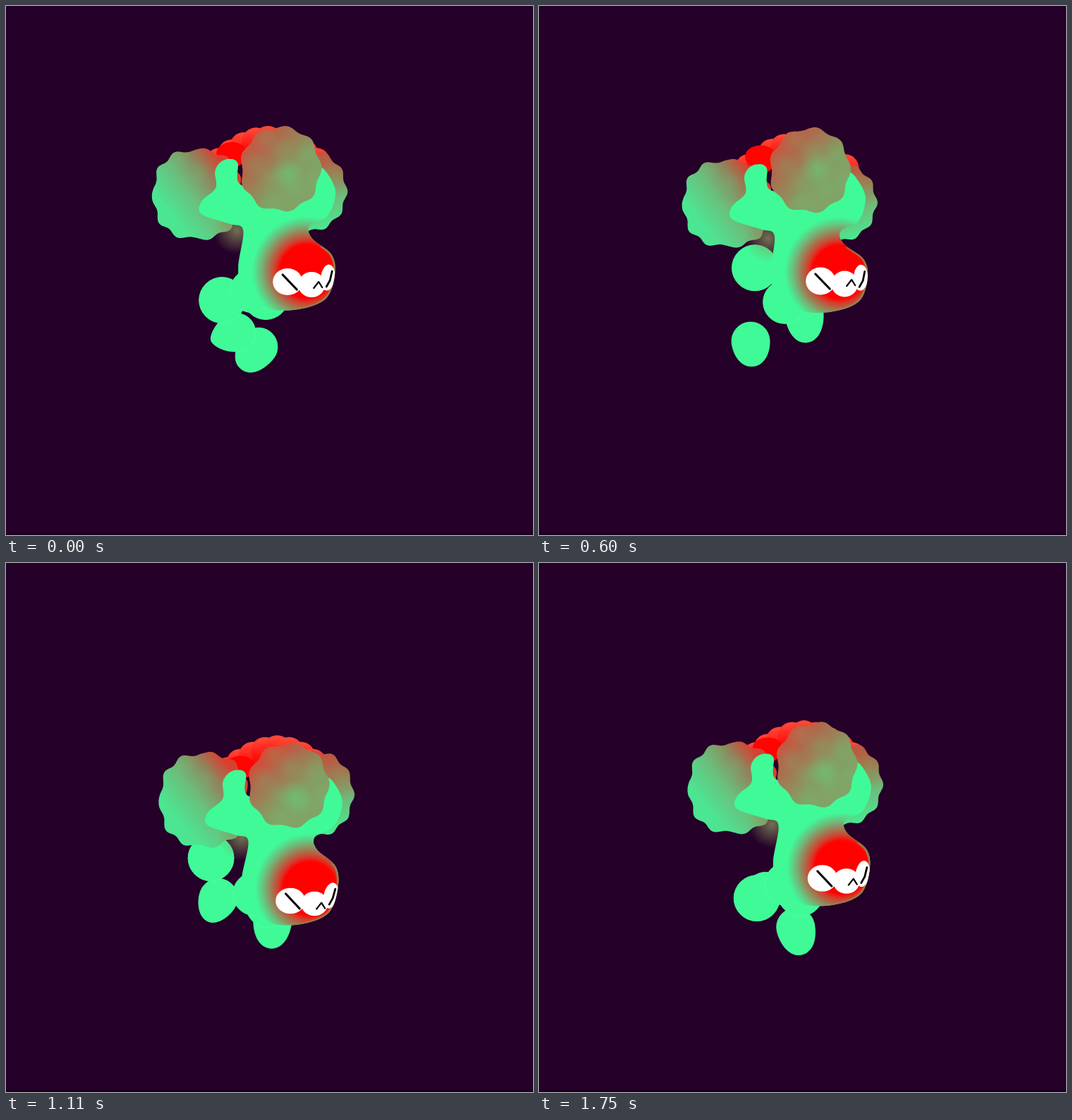
Write an HTML page with a canvas that moves like this. It is 747x750 px and loops after 1780 ms.

```html
<!DOCTYPE html>
<html lang="en">
<head>
<meta charset="utf-8">
<title>Running tree</title>
<style>
html, body { margin: 0; width: 100%; height: 100%; overflow: hidden; background: #250028; }
canvas { display: block; }
</style>
</head>
<body>
<canvas id="stage" width="747" height="750"></canvas>
<script>
const ctx = document.getElementById('stage').getContext('2d');
const LOOP = 1780, STEP = 455, BEAT = 30, TAU = Math.PI * 2;
const GREEN = '#40fa98', RIM = '#4bffa2';

// Bounce of the face: phase, height, lean
const bounce = [
  [20, 370, 0], [145, 389, -.28], [248, 556, 1], [300, 570, 1.1],
  [360, 492, .48], [385, 446, .08], [415, 390, 0]
];

// Trunk and head outline, measured from the face
const trunk = [
  [-96, -168], [-84, -173], [-71, -168], [-62, -135], [30, -150], [44, -162],
  [56, -153], [68, -126], [57, -93], [31, -78], [35, -60], [62, -38],
  [67, -10], [54, 25], [15, 40], [-30, 38], [-64, 12], [-70, -20],
  [-63, -72], [-82, -81], [-122, -95], [-122, -113], [-102, -132], [-103, -155]
];

const mix = (a, b, k) => a + (b - a) * k;
const clamp = (v, lo = 0, hi = 1) => Math.max(lo, Math.min(hi, v));
const wrap = (v, n) => ((v % n) + n) % n;
const bell = (v, mid, width) => Math.exp(-(((v - mid) / width) ** 2));

// Smooth periodic curve through the bounce keys, without overshoot
function pose(phase) {
  const n = bounce.length, key = i => bounce[wrap(i, n)];
  const gap = i => wrap(key(i + 1)[0] - key(i)[0], STEP);
  let i = 0;
  while (wrap(phase - key(i)[0], STEP) >= gap(i)) i++;
  const h = gap(i), s = wrap(phase - key(i)[0], STEP) / h;
  const [y, tilt] = [1, 2].map(c => {
    const slope = j => (key(j + 1)[c] - key(j)[c]) / gap(j);
    const tangent = j => {
      const a = slope(j - 1), b = slope(j);
      return a * b <= 0 ? 0 : 2 * a * b / (a + b);
    };
    return mix(key(i)[c], key(i + 1)[c], s * s * (3 - 2 * s)) +
      s * (1 - s) * h * ((1 - s) * tangent(i) - s * tangent(i + 1));
  });
  return { x: 398.3 + (y - 370) * .045, y, lean: tilt };
}

let face;

// Leaning shears the figure and lifts whatever lies farther back.
function place(x, y, depth = 0) {
  return [
    face.x + x + .12 * Math.max(0, -y) * face.lean,
    face.y + y - depth * face.lean
  ];
}

function smooth(pts) {
  const n = pts.length, at = i => pts[wrap(i, n)];
  const path = new Path2D();
  path.moveTo(...pts[0]);
  for (let i = 0; i < n; i++) {
    const [a, b, c, d] = [at(i - 1), at(i), at(i + 1), at(i + 2)];
    path.bezierCurveTo(
      b[0] + (c[0] - a[0]) / 6, b[1] + (c[1] - a[1]) / 6,
      c[0] - (d[0] - b[0]) / 6, c[1] - (d[1] - b[1]) / 6, c[0], c[1]);
  }
  path.closePath();
  return path;
}

function stops(g, colors) {
  for (const [at, color] of colors) g.addColorStop(at, color);
  return g;
}
const linear = (a, b, colors) => stops(ctx.createLinearGradient(...a, ...b), colors);
const radial = (p, r, colors) => stops(ctx.createRadialGradient(...p, 0, ...p, r), colors);

function inside(path, draw) {
  ctx.save();
  ctx.clip(path);
  draw();
  ctx.restore();
}

function glow([x, y], r, rgb, alpha) {
  ctx.fillStyle = radial([x, y], r, [[0, `rgba(${rgb},${alpha})`], [1, `rgba(${rgb},0)`]]);
  ctx.fillRect(x - r, y - r, r * 2, r * 2);
}

// A knobbly leaf ball: squareness below 1 fills out the corners.
function leaf([cx, cy], rx, ry, knobs, turn, square, from, to, colors) {
  const round = v => Math.sign(v) * Math.abs(v) ** square;
  const pts = [];
  for (let i = 0; i < knobs * 6; i++) {
    const a = i / (knobs * 6) * TAU;
    const r = 1 + .04 * Math.cos(knobs * (a - turn));
    pts.push([cx + rx * r * round(Math.cos(a)), cy + ry * r * round(Math.sin(a))]);
  }
  const path = smooth(pts);
  const at = ([u, v]) => [cx + u * rx, cy + v * ry];
  ctx.fillStyle = linear(at(from), at(to), colors);
  ctx.fill(path);
  inside(path, () => {
    for (let i = 1; i < 9; i++) {
      const a = i * 2.4, d = Math.sqrt(i / 9);
      glow(at([d * Math.cos(a), d * Math.sin(a)]), 20, '100,210,125', .16);
    }
  });
}

function ball([x, y], r) {
  ctx.beginPath();
  ctx.arc(x, y, r - .5, 0, TAU);
  ctx.fillStyle = GREEN;
  ctx.fill();
  ctx.strokeStyle = RIM;
  ctx.lineWidth = 1;
  ctx.stroke();
}

// Each foot swings forward for one step, then pushes back for the next.
function foot(phase) {
  const p = wrap(phase - 145, STEP * 2), s = (p % STEP) / STEP;
  const arch = Math.sin(Math.PI * s), swing = p < STEP;
  let x, y, deg, reach, toe;
  if (swing) {
    x = 300 + 76 * s * s;
    y = 475 - 35 * s * s;
    deg = 85 + 80 * arch;
    reach = 22 + 10 * arch;
    toe = 14 - 8 * arch;
  } else {
    x = 376 - 73 * s * s + 8 * arch;
    y = face.y + mix(51, 84, s) - 55 * bell(s, .24, .14) + 128 * bell(s, .725, .1);
    deg = 85 + 45 * arch * Math.cos(TAU * (s - .6) / .26);
    reach = 26;
    toe = 14;
  }
  const heel = 27, tip = reach + toe;
  ctx.save();
  ctx.translate(x, y);
  ctx.rotate(deg * Math.PI / 180);
  ctx.beginPath();
  ctx.arc(0, 0, heel, Math.PI / 2, -Math.PI / 2);
  ctx.bezierCurveTo(reach * .6, -heel, tip, -toe * 1.4, tip, 0);
  ctx.bezierCurveTo(tip, toe * 1.4, reach * .6, heel, 0, heel);
  ctx.fillStyle = GREEN;
  ctx.fill();
  ctx.strokeStyle = RIM;
  ctx.lineWidth = .8;
  ctx.stroke();
  ctx.restore();
}

function hands(phase) {
  const pull = Math.max(0, Math.cos((phase - 248) / STEP * TAU)) ** 3;
  const late = pose(phase - 22);
  ball([face.x - 93 - 40 * pull, late.y - 12], 33);
  ball([face.x - 31, face.y + 22 - 32 * pull], 33);
  ball(place(-51, 14, 60), 31);
}

function backLeaves() {
  const tall = 1 + .12 * face.lean;
  for (let i = 0; i < 9; i++) {
    const p = place(-96 + 17 * i, -169 - 31 * Math.sin(Math.PI * i / 8), 36);
    ctx.fillStyle = linear([p[0], p[1] - 20], [p[0], p[1] + 12], [[0, '#ff4c3a'], [1, '#ff0a06']]);
    ctx.beginPath();
    ctx.arc(...p, 20, 0, TAU);
    ctx.fill();
  }
  const pit = place(-79, -181, 20);
  ctx.fillStyle = '#ff0400';
  ctx.beginPath();
  ctx.ellipse(...pit, 22, 16, 0, 0, TAU);
  ctx.fill();

  leaf(place(31, -128, 60), 52, 57 * tall, 11, -.55, 1, [-.1, -.9], [.6, .9],
    [[0, '#c4503c'], [.35, '#a0774f'], [.65, '#70b97b'], [1, '#48eb92']]);
  leaf(place(-128, -123, 50), 62, 63 * tall, 11, .25, .85, [-.7, .3], [.6, -.7],
    [[0, '#4ce592'], [.4, '#6bbd7c'], [.75, '#947f59'], [1, '#d8402f']]);
  glow(place(-72, -72, 45), 34, '140,150,95', .75);
}

function frontLeaf() {
  const k = clamp(face.lean);
  leaf(place(-10, -159, 10), 56, 59, 9, -1.43, .95,
    [mix(-.95, -.5, k), -.8], [mix(.5, .05, k), mix(.4, .7, k)],
    [[0, `rgb(${mix(215, 255, k)},${mix(75, 35, k)},${mix(58, 30, k)})`],
      [.38, '#aa6e4e'], [.8, '#859d62'], [1, '#82a266']]);
  glow(place(0, -153, -20), 24, '95,215,130', .5);
}

function eye(p, rx, ry, turn) {
  ctx.beginPath();
  ctx.ellipse(...p, rx, ry, turn, 0, TAU);
  ctx.fill();
}

function mark(width, depth, ...pts) {
  ctx.beginPath();
  for (const p of pts) ctx.lineTo(...place(...p, depth));
  ctx.lineWidth = width;
  ctx.stroke();
}

function body() {
  const shape = smooth(trunk.map(([x, y]) =>
    place(x, y, 30 - 14 * clamp((y + 60) / 100))));
  ctx.fillStyle = GREEN;
  ctx.fill(shape);
  inside(shape, () => {
    const [x, y] = place(27, -14, 7), r = 80;
    ctx.fillStyle = radial([x, y], r, [
      [0, '#ff0000'], [.47, '#ff0200'], [.56, '#d43e2d'], [.68, '#a07a52'],
      [.82, '#6ebc7c'], [.94, '#48ee94'], [1, 'rgba(64,250,152,0)']]);
    ctx.fillRect(x - r, y - r, r * 2, r * 2);

    ctx.save();
    ctx.beginPath();
    ctx.rect(x - 30, y - 35, 90, 110);
    ctx.clip();
    ctx.strokeStyle = linear([x - 30, 0], [x + 40, 0],
      [[0, 'rgba(140,140,85,0)'], [1, 'rgba(140,140,85,.9)']]);
    ctx.lineWidth = 5;
    ctx.stroke(shape);
    ctx.restore();

    const squash = 1 - .1 * face.lean;
    ctx.fillStyle = '#fff';
    eye(place(0, 1), 21, 19 * squash, 0);
    eye(place(34, 5), 19, 18 * squash, 0);
    eye(place(57, -5, 4), 10, 18.5, mix(.12, .42, face.lean));
    ctx.strokeStyle = '#000';
    ctx.lineCap = ctx.lineJoin = 'round';
    mark(3.2, 0, [-7, -9], [13, 12]);
    mark(2.2, -7, [37, 10], [44, 1], [49, 9]);
    mark(2.8, 5, [63, -14], [60, -1], [55, 8]);
  });
}

function draw(t) {
  // The first stretch runs slightly quicker.
  const phase = t < 600 ? mix(-40, 600, t / 600) : t;
  face = pose(phase);

  ctx.fillStyle = '#250028';
  ctx.fillRect(0, 0, 747, 750);
  ctx.fillStyle = '#16001a';
  ctx.fillRect(0, 748, 747, 2);

  foot(phase);
  foot(phase + STEP);
  hands(phase);
  backLeaves();
  body();
  frontLeaf();
}

// The picture changes on a steady beat that restarts once, at 1150.
const start = performance.now();
function tick() {
  const t = (performance.now() - start) % LOOP;
  const base = t < 1150 ? 0 : 1150;
  draw(base + Math.floor((t - base) / BEAT) * BEAT);
  requestAnimationFrame(tick);
}
tick();
</script>
</body>
</html>
```
